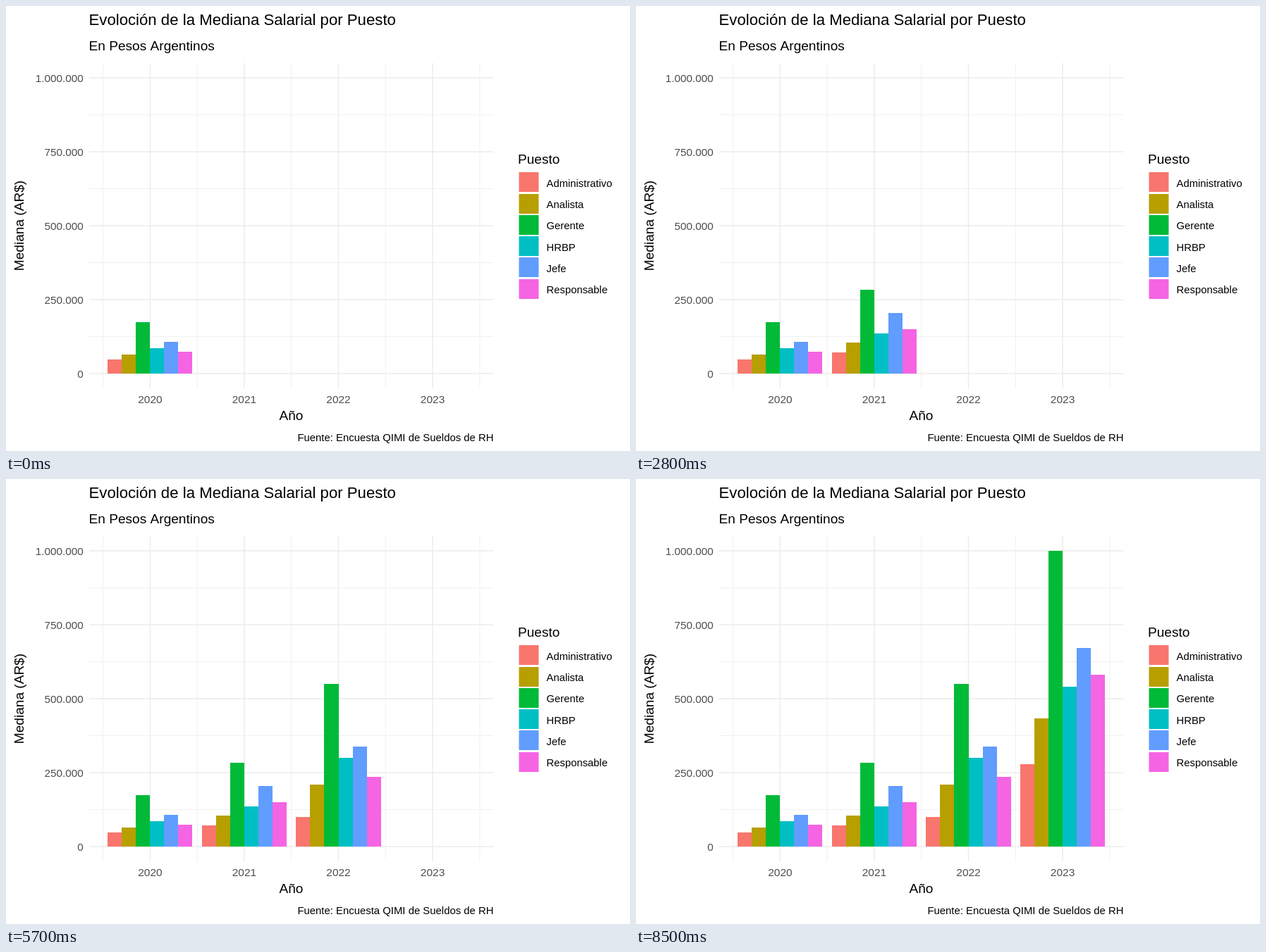
Write an HTML page with a canvas that moves like this. It is 885 px wide and 632 px high and loops after 10 s.

```html
<!DOCTYPE html>
<html lang="es">
<head>
<meta charset="utf-8">
<title>Evoloción de la Mediana Salarial por Puesto</title>
<style>
  html, body { margin: 0; width: 100%; height: 100%; overflow: hidden; background: #fff; }
  canvas { display: block; }
</style>
</head>
<body>
<canvas id="chart" width="885" height="632"></canvas>
<script>
const ctx = document.getElementById('chart').getContext('2d');

const LOOP = 10000, STEP = 100, STEPS = 14;
const STARTS = [1500, 4400, 7200];
const PANEL = { left: 118, right: 691, top: 81, bottom: 543 };
const YEAR_GAP = 133.55, FIRST_YEAR = 204.4, BAR = YEAR_GAP * 0.15;
const ZERO = 522, PER_THOUSAND = 0.42;

const ROLES = [
  ['Administrativo', '#F8766D'],
  ['Analista', '#B79F00'],
  ['Gerente', '#00BA38'],
  ['HRBP', '#00BFC4'],
  ['Jefe', '#619CFF'],
  ['Responsable', '#F564E3']
];

// Median pay in thousands, one row per year
const PAY = [
  [47, 64, 175, 86, 107, 75],
  [71, 105, 283.5, 135, 204, 149],
  [100, 210, 550, 300, 339, 235],
  [279, 434, 1000, 540, 672, 580]
];

const yearX = i => FIRST_YEAR + i * YEAR_GAP;
const payY = v => ZERO - v * PER_THOUSAND;

function text(str, x, y, size, align = 'left', color = '#000') {
  ctx.font = `${size}px "Liberation Sans", Arial, sans-serif`;
  ctx.fontKerning = 'none';
  ctx.textAlign = align;
  ctx.fillStyle = color;
  ctx.fillText(str, x, y);
}

function line(x0, y0, x1, y1, width) {
  ctx.lineWidth = width;
  ctx.beginPath();
  ctx.moveTo(x0, y0);
  ctx.lineTo(x1, y1);
  ctx.stroke();
}

function drawGrid() {
  const { left, right, top, bottom } = PANEL;
  const across = (v, w) => line(left, payY(v), right, payY(v), w);
  const down = (i, w) => line(yearX(i), top, yearX(i), bottom, w);
  ctx.strokeStyle = '#EBEBEB';
  for (let v = 125; v < 1000; v += 250) across(v, 0.75);
  for (let i = -0.5; i < 4; i++) down(i, 0.75);
  for (let v = 0; v <= 1000; v += 250) across(v, 1.45);
  for (let i = 0; i < 4; i++) down(i, 1.45);
}

function drawLabels() {
  text('Evoloción de la Mediana Salarial por Puesto', 117.5, 27, 22.2);
  text('En Pesos Argentinos', 117.5, 63, 19.1);
  ['0', '250.000', '500.000', '750.000', '1.000.000'].forEach((s, i) =>
    text(s, 109.7, payY(i * 250) + 6, 15.3, 'right', '#4D4D4D'));
  for (let i = 0; i < 4; i++) text(String(2020 + i), yearX(i), 564, 15.5, 'center', '#4D4D4D');
  text('Año', 404.5, 588, 19.1, 'center');
  text('Fuente: Encuesta QIMI de Sueldos de RH', 691.5, 618, 14.9, 'right');

  ctx.save();
  ctx.translate(25, 312);
  ctx.rotate(-Math.PI / 2);
  text('Mediana (AR$)', 0, 0, 19.1, 'center');
  ctx.restore();
}

function drawLegend() {
  text('Puesto', 726, 224, 19.1);
  ROLES.forEach(([name, color], i) => {
    const mid = 250.3 + i * 30.24;
    ctx.fillStyle = color;
    ctx.fillRect(727.5, Math.round(mid - 14), 28, 28);
    text(name, 766.5, Math.round(mid + 6.5), 14.85);
  });
}

function drawBars(year, pay) {
  const left = yearX(year) - 3 * BAR;
  pay.forEach((v, i) => {
    const x0 = Math.round(left + i * BAR), x1 = Math.round(left + (i + 1) * BAR);
    const y = Math.round(payY(v));
    ctx.fillStyle = ROLES[i][1];
    ctx.fillRect(x0, y, x1 - x0, ZERO - y);
  });
}

function draw(time) {
  ctx.fillStyle = '#fff';
  ctx.fillRect(0, 0, 885, 632);
  drawGrid();
  drawBars(0, PAY[0]);
  // Each year's bars slide out of the previous year's, which stay behind
  STARTS.forEach((start, i) => {
    if (time < start) return;
    const p = Math.min(STEPS, Math.floor((time - start) / STEP) + 1) / STEPS;
    drawBars(i + p, PAY[i].map((v, j) => v + (PAY[i + 1][j] - v) * p));
  });
  drawLabels();
  drawLegend();
}

const begin = performance.now();
function tick() {
  draw((performance.now() - begin) % LOOP);
  requestAnimationFrame(tick);
}
tick();
</script>
</body>
</html>
```
